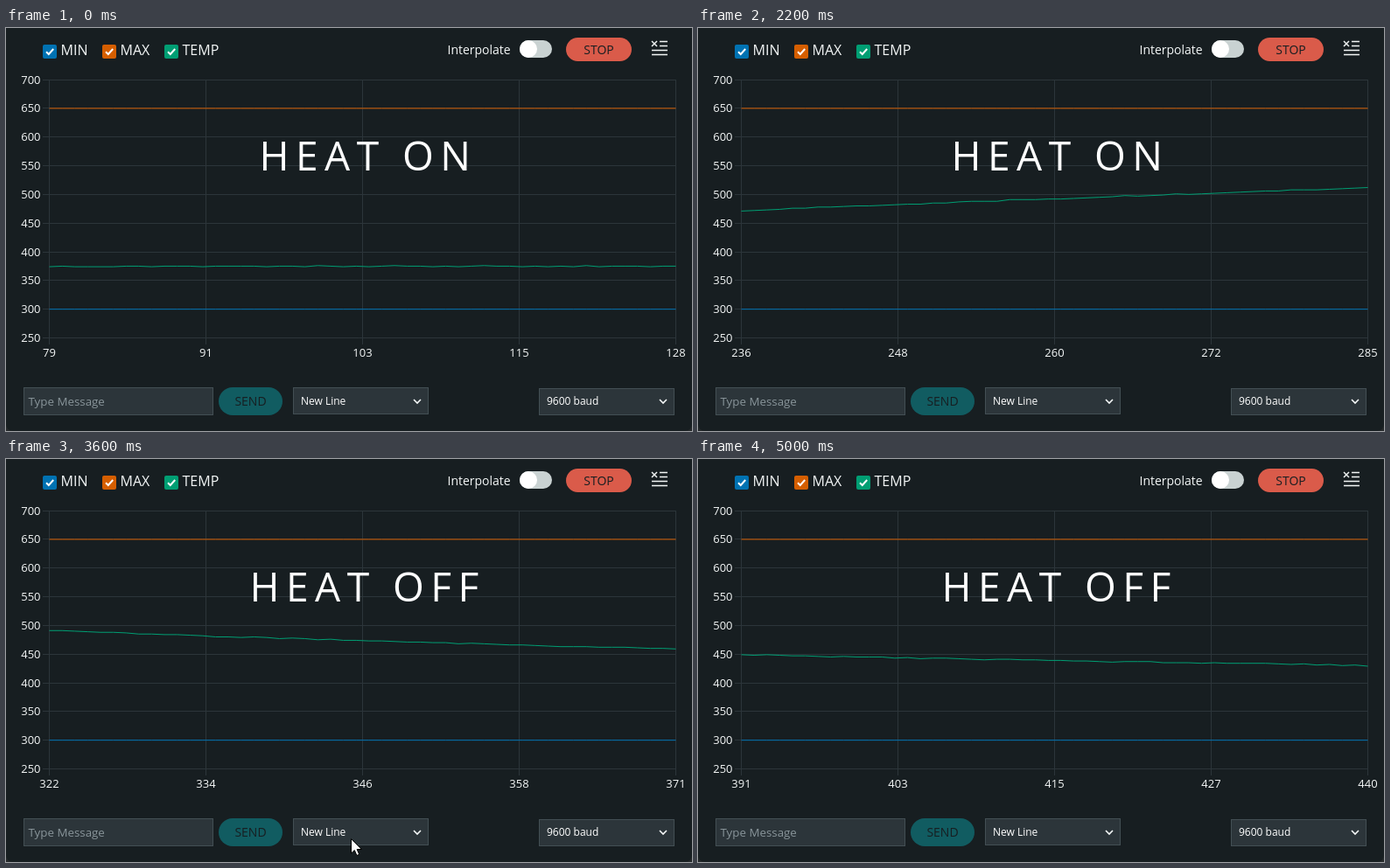
Animation, 784 px wide and 461 px high, one loop 5200 ms. Source, as an HTML page with a canvas:

```html
<!DOCTYPE html>
<html lang="en">
<head>
<meta charset="utf-8">
<title>Serial plotter</title>
<style>
html, body { margin: 0; width: 100%; height: 100%; overflow: hidden; background: #171e21; }
canvas { display: block; width: 784px; height: 461px; }
</style>
</head>
<body>
<canvas id="stage" width="784" height="461"></canvas>
<script>
const ctx = document.getElementById('stage').getContext('2d');
const LOOP = 5200, STEP = 200, SAMPLES = 50;
const LEFT = 49.5, WIDTH = 716, TOP = 59.1, BOTTOM = 354.48;
const BG = '#171e21', PANEL = '#2c353a', EDGE = '#434f54', TEXT = '#f4f7f7';
const BLUE = '#0072b2', ORANGE = '#d55e00', GREEN = '#009e73';

// [time step, first sample in view]
const scroll = [[0, 79], [7, 192], [11, 236], [14, 271], [18, 322], [22, 362], [25, 391]];

function lerpAt(points, x) {
  let i = 1;
  while (i < points.length - 1 && points[i][0] < x) i++;
  const [x0, y0] = points[i - 1], [x1, y1] = points[i];
  return y0 + (y1 - y0) * (x - x0) / (x1 - x0);
}

// Seeded noise in -1..1
function noise(n) {
  const s = Math.sin(n * 127.1 + 3.7) * 43758.5453;
  return 2 * (s - Math.floor(s)) - 1;
}

// Idle at 375, exponential heating towards 622, then cooling towards 391
function temperature(n) {
  const heating = 622 - 247 * Math.exp(-(n - 158) / 158);
  const cooling = 391 + 126 * Math.exp(-(n - 293) / 126);
  return Math.round(Math.max(374.7, Math.min(heating, cooling)) + noise(n));
}

const yOf = v => BOTTOM - (v - 250) * (BOTTOM - TOP) / 450;
const xOf = i => LEFT + i * WIDTH / (SAMPLES - 1);

function text(str, x, y, size, color = TEXT, align = 'left') {
  ctx.font = `${size}px "Open Sans", sans-serif`;
  ctx.textAlign = align;
  ctx.fillStyle = color;
  ctx.fillText(str, x, y);
}

function path(points, color, width = 1) {
  ctx.beginPath();
  points.forEach(([x, y]) => ctx.lineTo(x, y));
  ctx.strokeStyle = color;
  ctx.lineWidth = width;
  ctx.stroke();
}

function round(x, y, w, h, r, color) {
  ctx.beginPath();
  ctx.roundRect(x, y, w, h, r);
  ctx.fillStyle = color;
  ctx.fill();
}

function field(x, y, w, h) {
  round(x, y, w, h, 0, PANEL);
  ctx.strokeStyle = EDGE;
  ctx.lineWidth = 1;
  ctx.strokeRect(x + 0.5, y + 0.5, w - 1, h - 1);
}

function select(x, y, label) {
  field(x, y, 155, 31);
  text(label, x + 9, 431, 12, '#ffffff');
  path([[x + 138, 425], [x + 142, 429], [x + 146, 425]], TEXT, 1.6);
}

function checkbox(x, label, color) {
  round(x, 19, 16, 16, 2, color);
  path([[x + 4, 27.2], [x + 6.8, 30], [x + 12.2, 24]], '#ffffff', 2);
  text(label, x + 20.5, 31, 16);
}

function clearIcon(x, y) {
  path([[x, y], [x + 6, y + 6]], TEXT, 1.4);
  path([[x + 6, y], [x, y + 6]], TEXT, 1.4);
  for (let i = 0; i < 4; i++) {
    const rowY = y + 0.5 + 5 * i;
    path([[i < 2 ? x + 9 : x, rowY], [x + 18, rowY]], TEXT, 1.5);
  }
}

function header() {
  checkbox(42, 'MIN', BLUE);
  checkbox(110, 'MAX', ORANGE);
  checkbox(181, 'TEMP', GREEN);
  text('Interpolate', 504.5, 30, 14);
  round(587, 14, 37, 20, 10, '#c9d2d2');
  round(587, 14, 20, 20, 10, '#ffffff');
  round(640, 11, 75, 27, 13.5, '#da5b4a');
  text('STOP', 677.5, 30, 14, BG, 'center');
  clearIcon(738, 15);
}

function footer() {
  field(20, 411, 217, 32);
  text('Type Message', 25.5, 432, 13.33, '#89959a');
  round(243, 411, 73, 32, 16, '#115c61');
  text('SEND', 279.5, 432, 14, BG, 'center');
  select(328, 411, 'New Line');
  select(609, 412, '9600 baud');
}

function chart(first) {
  for (let v = 250; v <= 700; v += 50) {
    const y = Math.floor(yOf(v)) + 0.5;
    path([[42, y], [LEFT + WIDTH, y]], PANEL);
    text(v, 39.5, y + 4, 13, TEXT, 'right');
  }
  for (let k = 0; k <= 4; k++) {
    const x = LEFT + k * WIDTH / 4;
    path([[x, TOP], [x, 362]], PANEL);
    text(first + Math.floor(k * (SAMPLES - 1) / 4), x, 376, 13, TEXT, 'center');
  }
  const trace = (value, color) => path(
    Array.from({ length: SAMPLES }, (_, i) => [xOf(i), yOf(value(first + i))]), color);
  trace(() => 300, BLUE);
  trace(() => 650, ORANGE);
  trace(temperature, GREEN);
}

function title(str, x) {
  ctx.fontKerning = 'none';
  ctx.letterSpacing = '7.5px';
  text(str, x, 163, 46, '#ffffff');
  ctx.letterSpacing = '0px';
  ctx.fontKerning = 'auto';
}

function pointer(x, y) {
  const shape = [[0, 0], [0, 16.5], [3.8, 13], [6.4, 19], [9.2, 17.8], [6.6, 12], [11.8, 12]];
  ctx.beginPath();
  shape.forEach(([dx, dy]) => ctx.lineTo(x + dx + 0.5, y + dy + 0.5));
  ctx.closePath();
  ctx.fillStyle = '#ffffff';
  ctx.fill();
  ctx.strokeStyle = '#000000';
  ctx.lineWidth = 1;
  ctx.stroke();
}

function draw(now) {
  const step = Math.floor((now % LOOP) / STEP);
  ctx.fillStyle = '#24282a';
  ctx.fillRect(0, 0, 784, 461);
  round(0, 0, 784, 461, [0, 0, 8, 8], BG);
  header();
  chart(Math.round(lerpAt(scroll, step)));
  footer();
  if (step < 12) title('HEAT ON', 289.5);
  else title('HEAT OFF', 278.5);
  // The mouse slips out over the bottom edge
  if (step === 18 || step === 19) pointer(394 - 6 * (step - 18), 434 + 17 * (step - 18));
}

const start = performance.now();
function tick() {
  draw(performance.now() - start);
  requestAnimationFrame(tick);
}
tick();
</script>
</body>
</html>
```
